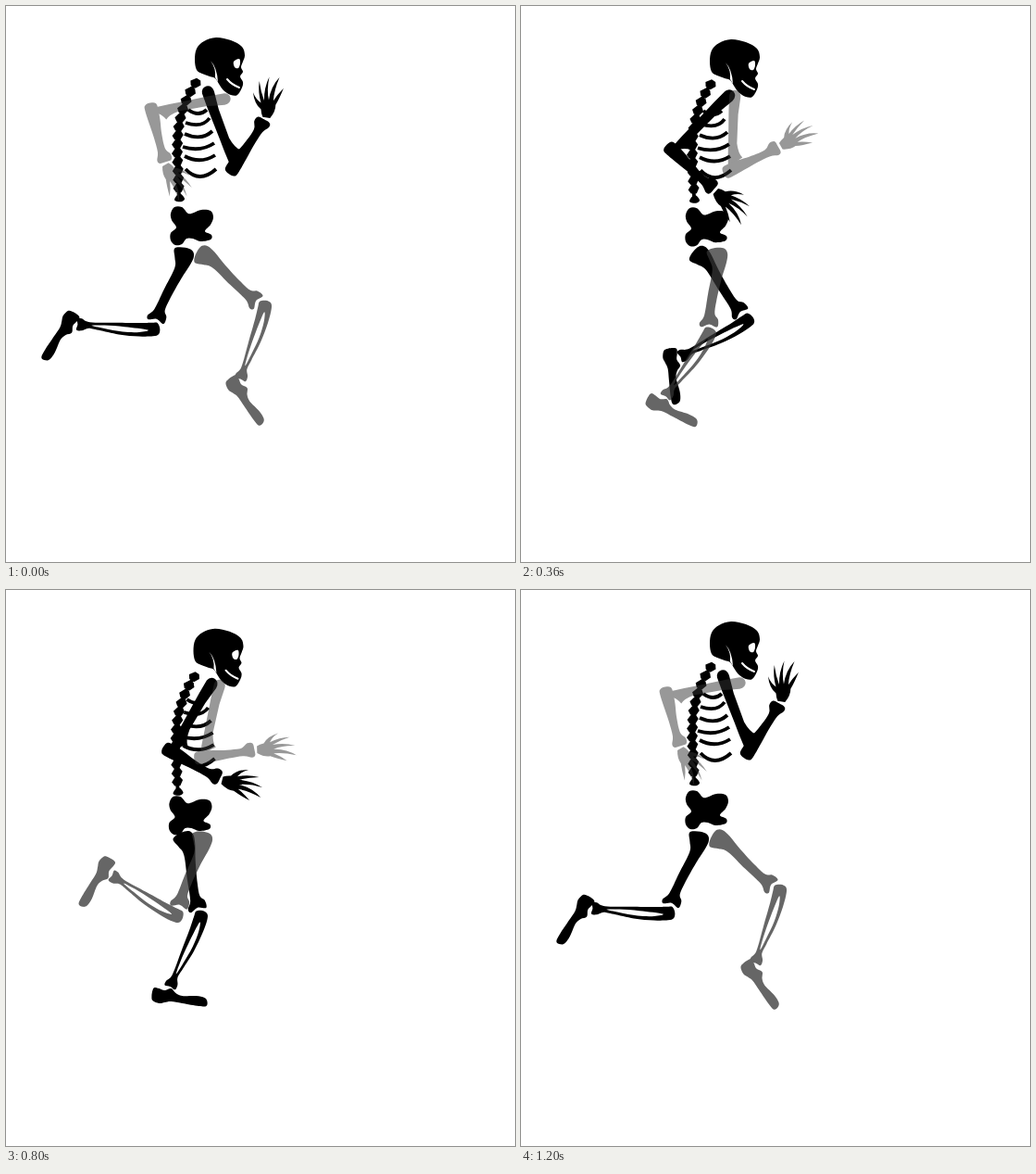
Animation of 550x600 px, one loop 1.24 s. Source, as an HTML page:

```html
<!DOCTYPE html>
<html lang="en">
<head>
<meta charset="utf-8">
<title>Running skeleton</title>
<style>
html, body { margin: 0; width: 100%; height: 100%; overflow: hidden; background: #fff; }
svg { display: block; width: 550px; height: 600px; }
.line { fill: none; stroke: #000; stroke-width: 3.8; }
.cut { fill: none; stroke: #fff; stroke-width: 2; stroke-linecap: round; }
.far { fill: #333; }
</style>
</head>
<body>
<svg id="stage" viewBox="0 0 550 600"></svg>
<script>
const FRAME = 40, LOOP = 1240, CYCLE = 30;
const stage = document.getElementById('stage');

function add(parent, tag, attrs = {}) {
  const el = document.createElementNS('http://www.w3.org/2000/svg', tag);
  for (const k in attrs) el.setAttribute(k, attrs[k]);
  return parent.appendChild(el);
}

// Smooth closed curve through "x,y x,y ..."
function smooth(text) {
  const p = text.split(' ').map(s => s.split(',').map(Number)), n = p.length;
  let d = 'M' + p[0];
  for (let i = 0; i < n; i++) {
    const [a, b, c, e] = [-1, 0, 1, 2].map(k => p[(i + k + n) % n]);
    const c1 = b.map((v, k) => v + (c[k] - a[k]) / 6);
    const c2 = c.map((v, k) => v - (e[k] - b[k]) / 6);
    d += `C${c1} ${c2} ${c}`;
  }
  return d + 'Z';
}

// Periodic curve through {frame: value} without overshoot
function track(keys, period = CYCLE) {
  const t = Object.keys(keys).map(Number), n = t.length;
  const at = i => t[(i + n) % n] + period * Math.floor(i / n);
  const val = i => keys[t[(i + n) % n]];
  const slope = i => (val(i + 1) - val(i)) / (at(i + 1) - at(i));
  const tangent = i => {
    const a = slope(i - 1), b = slope(i);
    return a * b > 0 ? 2 * a * b / (a + b) : 0;
  };
  return frame => {
    const f = frame % period;
    let i = n - 1;
    while (i > 0 && t[i] > f) i--;
    const h = at(i + 1) - at(i), u = (f - at(i)) / h, v = 1 - u;
    return val(i) * (1 + 2 * u) * v * v + tangent(i) * h * u * v * v
      + val(i + 1) * u * u * (3 - 2 * u) - tangent(i + 1) * h * u * u * v;
  };
}

const shape = {
  femur: smooth('-12.5,0 -10,-4 -2,-7 6,-7 10,-2 10,8 7,26 4.6,50 4.6,64 9,70 9,78 0,76 -8,80 -10.5,76 -6.4,67 -5.4,44 -4,18 -8,8'),
  shin: smooth('-6,1 -6,-5 0,-8 6,-7 8.5,-1 9.5,14 8.5,36 5,58 3.5,69 6.5,76 6,82 0,81 -6,82 -6.5,77 -3,68 -4,40 -5,14')
    + smooth('2,5 5,14 5.5,32 3,52 0.5,66 -0.5,52 0,30'),
  foot: smooth('-12,-11 -7,-10 -1,-8 6,-10 11,-5 18,-2 33,-2 42,0 45,4 44,9 36,9 18,6 6,4 -1,5 -7,6 -14,3 -15,-2 -14,-8'),
  humerus: 'M-6,-7Q-5,-13 1,-13Q7,-12 7,-5Q6,5 5,15L5,48Q7,60 12,64Q5,68 1,76L-4,76Q-5,60 -5,45L-6,10Z',
  forearm: smooth('-7,-4 -5,-9 1,-10 7,-8 8,-1 7,12 5,25 4,40 5,47 9,53 8,59 1,60 -6,60 -8,56 -5,47 -5,30 -6,15'),
  hand: 'M-4,0Q-9,8 -8,15Q-11,22 -14,34Q-8,26 -5,19Q-4,30 -8,45Q0,34 0,19Q4,30 3,44Q7,32 5,18Q10,27 13,38Q13,26 8,15Q14,18 18,25Q15,13 7,8Q6,3 4,0Z',
  pelvis: smooth('178,224 182,217 190,217 197,224 203,223 211,220 221,221 224,228 221,236 215,243 222,247 221,252 210,254 202,251 195,251 190,257 183,258 178,253 178,245 184,239 179,231'),
  skull: smooth('204,58 206,46 214,38 227,34 243,37 255,44 258,53 256,60 254,66 256,71 253,76 256,82 255,88 250,96 243,96 235,91 230,84 226,78 220,76 212,73 206,69'),
  eye: smooth('246,60 252,57 253,62 251,67 247,66')
};

const spin = (x, y, a) => `translate(${x} ${y}) rotate(${a})`;

// Three nested bones; angles are measured from straight down, forward positive
function limb(parent, parts, lengths, turns) {
  const joints = [];
  let g = parent;
  for (const part of parts) {
    g = add(g, 'g');
    add(g, 'path', { d: shape[part], 'fill-rule': 'evenodd' });
    joints.push(g);
  }
  const tracks = turns.map(k => track(k));
  return (f, x, y, scale = 1) => {
    let prev = 0;
    joints.forEach((j, i) => {
      const a = tracks[i](f);
      const place = i ? spin(0, lengths[i - 1], prev - a)
        : spin(x, y, -a) + ` scale(${scale})`;
      j.setAttribute('transform', place);
      prev = a;
    });
  };
}
const leg = (parent, ...turns) => limb(parent, ['femur', 'shin', 'foot'], [87, 94], turns);
const arm = (parent, ...turns) => limb(parent, ['humerus', 'forearm', 'hand'], [79, 63], turns);

// Torso and head
const spine = add(stage, 'g');
const spineX = y => 185 + (y < 160 ? 22 * ((160 - y) / 80) ** 2.6 : (y - 160) * 0.045);
let column = 'M';
for (let y = 80; y <= 206; y += 3) column += `${spineX(y)},${y} `;
add(spine, 'path', { d: column, class: 'line', 'stroke-width': 5 });
for (let i = 0; i < 13; i++) {
  const y = 83 + i * 9.4;
  const tilt = Math.atan(spineX(y - 1) - spineX(y)) * 57.3;
  add(spine, 'path', { d: 'M-6,1L-2,-5L3,-5L6,-1L3,5L-3,5Z', transform: spin(spineX(y), y, tilt) });
}
add(spine, 'path', { d: smooth('182,209 185,204 189,203 193,208 190,211 185,211') });

const trunk = add(stage, 'g');
add(trunk, 'path', { d: shape.pelvis });
add(trunk, 'path', {
  class: 'line',
  d: 'M197,112Q208,120 217,112M194,126Q212,132 220,121M193,138Q211,146 223,135'
    + 'M191,152Q210,158 225,148M193,162Q210,171 226,161M194,176Q209,192 227,176'
});

const head = add(stage, 'g');
add(head, 'path', { d: shape.skull });
add(head, 'path', { d: shape.eye, fill: '#fff' });
add(head, 'path', { d: 'M221,59Q228,66 229,82L226,77Q227,67 221,59Z', fill: '#fff' });
add(head, 'path', { d: 'M239,79Q244,85 252,88', class: 'cut' });

// Limbs
const nearLeg = leg(stage,
  { 0: -23.5, 4: -6, 7: 16, 12: 55, 16: 45.5, 20: 10.7, 24: -12.8 },
  { 0: -93, 4: -116, 7: -86, 12: -26, 16: -1, 20: -23, 24: -26, 27: -58 },
  { 0: -114, 4: -112, 7: -98, 12: -27, 16: 28, 20: 0, 24: -5, 27: -48 });
const nearArm = arm(stage,
  { 0: 20, 7: -31, 12: -60, 16: -65, 20: -30.5, 24: -23 },
  { 0: 147, 7: 65, 12: 27, 16: 15.7, 20: 61, 24: 91 },
  { 0: 172, 7: 46, 12: 50, 16: 33, 20: 76, 24: 93 });
const farLeg = leg(add(stage, 'g', { class: 'far', opacity: 0.75 }),
  { 0: 48.7, 7: 4.5, 12: -22, 16: -32, 20: -19.5, 24: 26.2, 27: 50 },
  { 0: -18, 2: -8, 7: -22.3, 12: -57.3, 16: -86, 20: -121, 24: -80, 27: -33 },
  { 0: -46, 3: 0, 7: -6, 12: -48, 16: -93, 20: -112, 24: -88, 27: -58 });
const farArm = arm(add(stage, 'g', { class: 'far', opacity: 0.5 }),
  { 0: -80, 7: -21.4, 12: 17, 16: 18, 20: -12.7, 24: -42.6 },
  { 0: 14.6, 7: 97.4, 12: 136, 16: 146, 20: 98.6, 24: 56 },
  { 0: 30, 7: 88, 12: 158, 16: 164, 20: 92, 24: 58 });

// The body bobs once per step, two steps per cycle
const bob = keys => track(keys, CYCLE / 2);
const sway = bob({ 0: 0, 3: -0.8, 5: -1.5, 7: 0, 12: 0 });
const headBob = bob({ 0: 0, 1: 1.7, 5: 7.7, 7: 7, 9: 2, 12: 0 });
const spineBob = bob({ 0: 0, 1: 2, 5: 10.5, 7: 5, 9: 1.5, 12: 0 });
const trunkBob = bob({ 0: 0, 1: 1.5, 5: 6, 7: 3, 9: 1.2, 12: 0.4 });

function draw(f) {
  const x = sway(f), y = headBob(f);
  const move = (el, dy) => el.setAttribute('transform', `translate(${x} ${dy})`);
  move(head, y);
  move(spine, spineBob(f));
  move(trunk, trunkBob(f));
  nearLeg(f, 193, 268);
  farLeg(f, 213, 268);
  nearArm(f, 220 + x, 99 + y);
  farArm(f, 230.5 + x, 101 + y, 0.94);
}

const start = performance.now();
function tick() {
  const t = (performance.now() - start) % LOOP;
  draw(Math.floor(t / FRAME) % CYCLE);
  requestAnimationFrame(tick);
}
tick();
</script>
</body>
</html>
```
